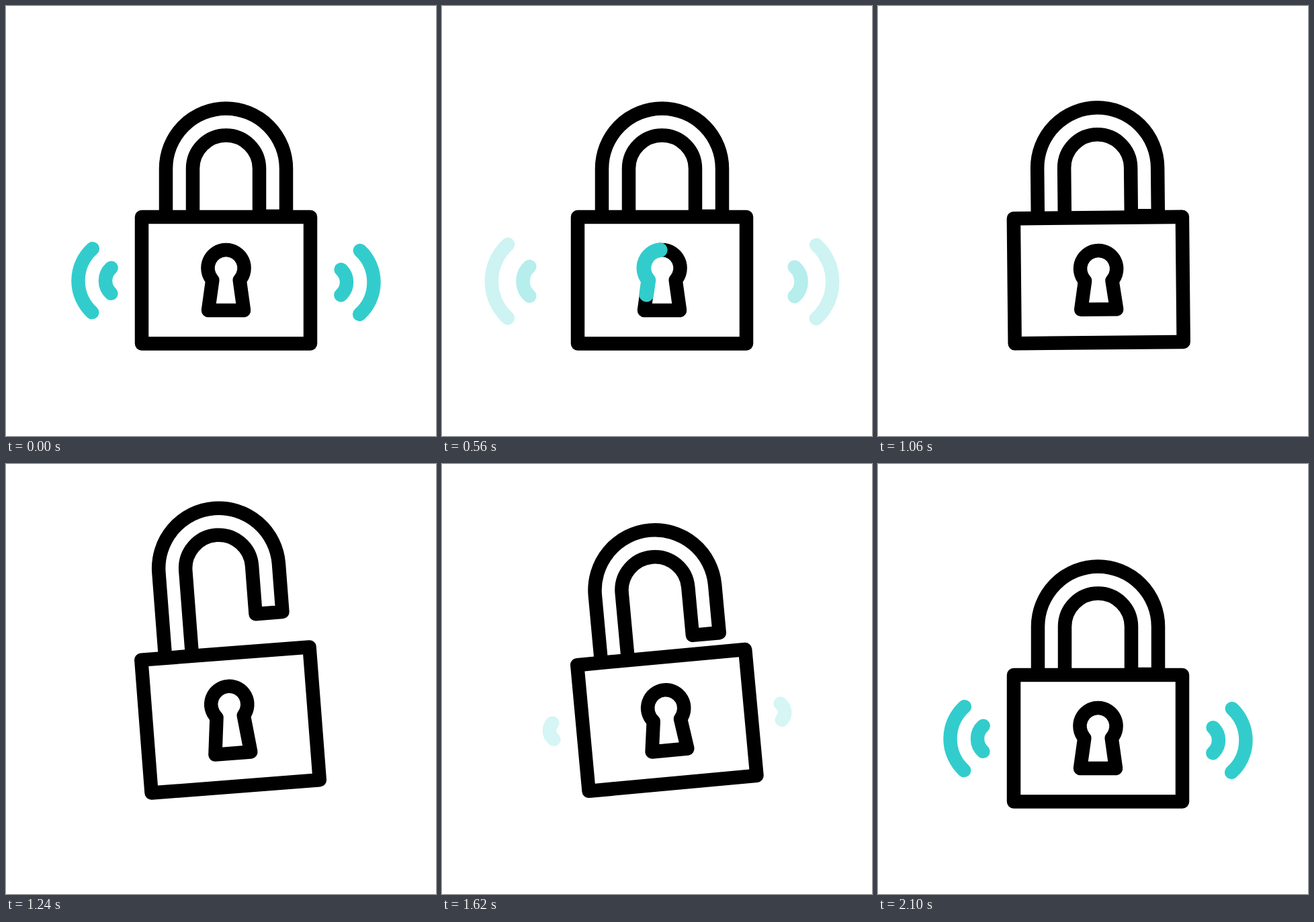
Write an HTML page that moves like this. It is 640 by 640 pixels and loops after 2.2 s.

```html
<!DOCTYPE html>
<html lang="en">
<head>
<meta charset="utf-8">
<title>Padlock</title>
<style>
  html, body { margin: 0; width: 100%; height: 100%; overflow: hidden; background: #fff; }
  svg { display: block; width: 100vw; height: 100vh; }
  path { fill: none; stroke: #000; stroke-width: 20.5; stroke-linejoin: round; }
  .teal { stroke: #33cccc; stroke-linecap: round; }
  #sweep { stroke-width: 21.8; }
</style>
</head>
<body>
<svg viewBox="0 0 640 640">
  <g id="lock">
    <path id="shackle"/>
    <path id="body"/>
    <path id="keyhole"/>
    <path id="sweep" class="teal" pathLength="100"/>
    <g id="waves">
      <path id="outer" class="teal"/>
      <path id="inner" class="teal"/>
    </g>
  </g>
</svg>
<script>
const LOOP = 2200, STEP = 20;
const el = Object.fromEntries([...document.querySelectorAll('[id]')].map(n => [n.id, n]));

const ramp = (t, a, b) => Math.min(1, Math.max(0, (t - a) / (b - a)));
const ease = (t, a, b) => { const u = ramp(t, a, b); return u * u * (3 - 2 * u); };

// The lock crouches, jumps open while stretching and tilting, then settles.
function pose(t) {
  const crouch = ease(t, 700, 1020) * (1 - ease(t, 1020, 1240));
  const stretch = ease(t, 1040, 1220) * (1 - ease(t, 1240, 1500));
  const settle = 1 - ease(t, 1260, 2090);
  return {
    lift: 44.2 * ease(t, 1020, 1356) * settle - 3 * crouch,
    open: 47.2 * ease(t, 1020, 1240) * settle + 8 * stretch - 2.4 * crouch,
    tilt: 8.8 * ease(t, 980, 1500) * settle,
    extra: 10 * stretch - 3 * crouch
  };
}

function shacklePath(raise) {
  const y = -72 - raise, end = Math.min(-1, -raise);
  return `M-89.5 0V${y}A89.5 89.5 0 0 1 89.5 ${y}V${end}H49.5V${y}` +
    `A49.5 49.5 0 0 0 -49.5 ${y}V0`;
}

function keyholePath(extra) {
  return `M0 49A27 27 0 0 1 20.2 94L26.5 ${139 + extra}H-26.5L-20.2 94A27 27 0 0 1 0 49Z`;
}

// A mirrored pair of arcs; vertex is the distance of the bulge from the axis.
function wavePath(vertex, chord, sag) {
  const r = (chord * chord + sag * sag) / (2 * sag), x = vertex - sag;
  return `M${-x} ${-chord}A${r} ${r} 0 0 0 ${-x} ${chord}` +
    `M${x} ${-chord}A${r} ${r} 0 0 1 ${x} ${chord}`;
}

function drawWaves(t) {
  const leaving = t < 1000;
  const spread = leaving ? 1 + 0.2 * ramp(t, 100, 700) : 1;
  const size = leaving ? 1 : 1 - 0.00075 * Math.max(0, 2100 - t);
  const arc = (reach, chord, sag) =>
    wavePath((169 + reach * size) * spread, chord * size * spread, sag * size * spread);
  const skew = 0.4 - (leaving ? 0.3 * ramp(t, 100, 360) : 0);
  el.waves.setAttribute('transform', `translate(0 96) rotate(${skew})`);
  el.outer.setAttribute('d', arc(51, 47.5, 21));
  el.inner.setAttribute('d', arc(10.5, 19, 8.5));
  el.outer.setAttribute('opacity', leaving ? 1 - ramp(t, 240, 660) : ramp(t, 1640, 1740));
  el.inner.setAttribute('opacity', leaving ? 1 - ramp(t, 380, 660) : ramp(t, 1600, 1700));
}

function drawSweep(t) {
  const head = 100 * ease(t, 100, 590), tail = 100 * ease(t, 290, 720);
  el.sweep.setAttribute('visibility', head - tail > 0.01 ? 'visible' : 'hidden');
  el.sweep.setAttribute('stroke-dasharray', `${head - tail} 200`);
  el.sweep.setAttribute('stroke-dashoffset', -tail);
}

function draw(t) {
  const { lift, open, tilt, extra } = pose(t);
  el.lock.setAttribute('transform', `translate(327.5 ${314 - lift}) rotate(${-tilt} 0 14)`);
  el.shackle.setAttribute('d', shacklePath(open));
  el.body.setAttribute('d', `M-125.5 0H125.5V${188.5 + extra}H-125.5Z`);
  el.keyhole.setAttribute('d', keyholePath(extra));
  el.sweep.setAttribute('d', keyholePath(extra));
  drawSweep(t);
  drawWaves(t);
}

const start = performance.now();
function frame() {
  const t = (performance.now() - start) % LOOP;
  draw(Math.floor(t / STEP) * STEP);
  requestAnimationFrame(frame);
}
frame();
</script>
</body>
</html>
```
